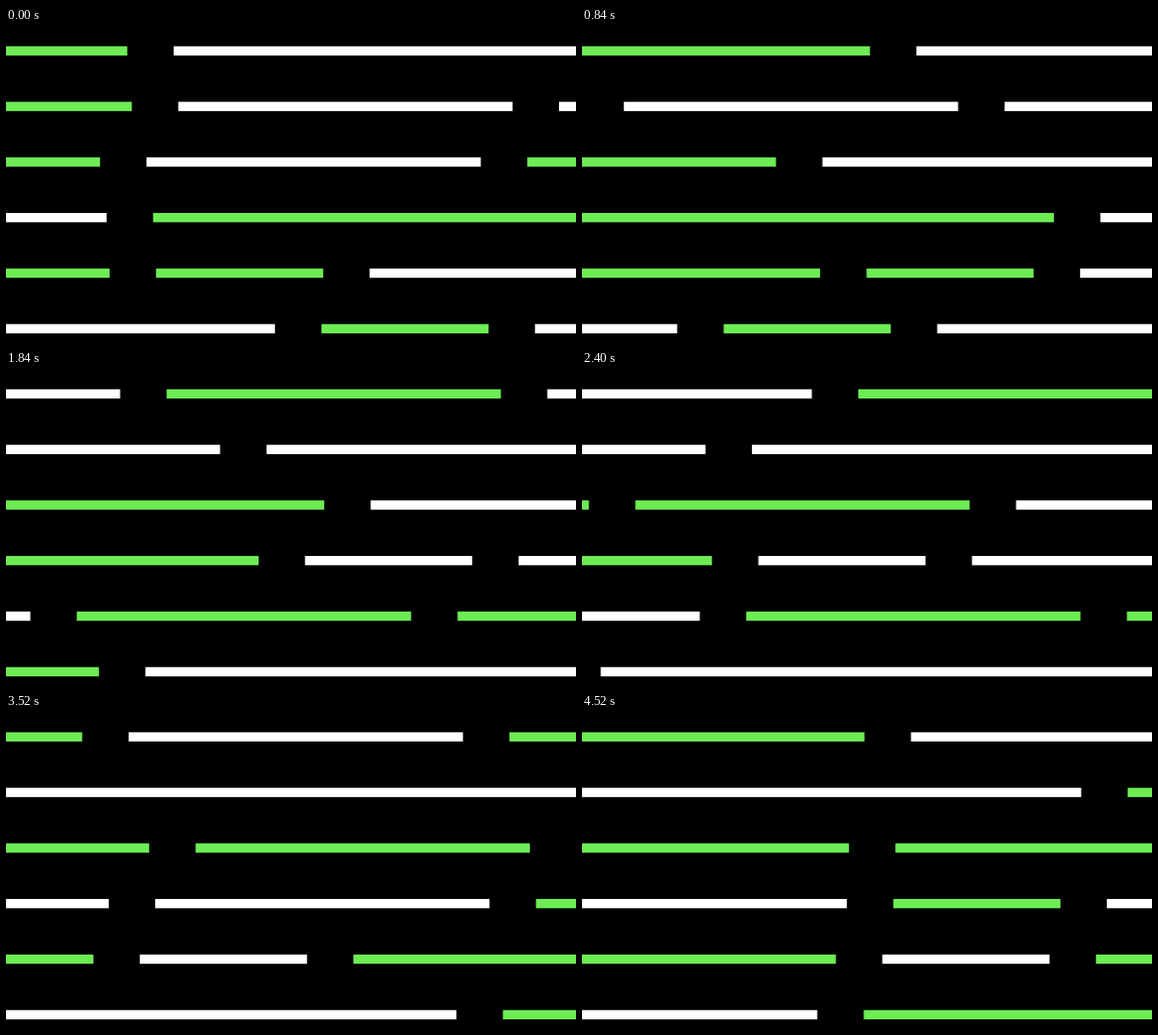
Write an HTML page that moves like this. It is 704 px wide and 390 px high and loops after 4560 ms.

```html
<!DOCTYPE html>
<html lang="en">
<head>
<meta charset="utf-8">
<title>Sliding bars</title>
<style>
html, body { margin: 0; width: 100%; height: 100%; overflow: hidden; background: #000; }
svg { display: block; width: 704px; height: 390px; }
.G { fill: #6dec54; }
.W { fill: #fff; }
/* --v is the signed speed of a row relative to the first one */
.row { animation: slide 4560ms -2ms infinite; }
@keyframes slide {
  0%       { transform: translateX(0px); animation-timing-function: steps(11); }
  9.6491%  { transform: translateX(calc(var(--v) * 103.4px)); animation-timing-function: steps(21); }
  28.0702% { transform: translateX(calc(var(--v) * 318.5px)); animation-timing-function: steps(28); }
  52.6316% { transform: translateX(calc(var(--v) * 604.3px)); animation-timing-function: steps(16); }
  66.6667% { transform: translateX(calc(var(--v) * 764.4px)); animation-timing-function: steps(24); }
  87.7193% { transform: translateX(calc(var(--v) * 1005.2px)); animation-timing-function: steps(12); }
  98.2456% { transform: translateX(calc(var(--v) * 1126px)); animation-timing-function: steps(1); }
  99.1228% { transform: translateX(calc(var(--v) * 1139.6px)); animation-timing-function: steps(1); }
  100%     { transform: translateX(calc(var(--v) * 1139.6px)); }
}
</style>
</head>
<body>
<svg id="stage" viewBox="0 0 704 390"></svg>
<script>
const UNIT = 206.45, GAP = 57.35, HEIGHT = 11.47, TOP = 22.6, PITCH = 68.8;

// speed, left edge of the first bar, bars as colour + length in units
const rows = [
  [1, -1203.6, "G2 W2 G2 W3"],
  [-0.783, -257.5, "G2 W2 W4 G2"],
  [0.6, -767, "G2 G2 W2 G2"],
  [-1.06, -288.6, "W2 G3 W1 W2 G1 W2"],
  [0.807, -1019, "G2 W1 G2 G1 W2"],
  [-1.043, -80.7, "W2 G1 W4 G2"]
];

function drawRow([speed, left, bars], i) {
  let x = left;
  const rects = bars.split(" ").map(([color, length]) => {
    const width = length * UNIT;
    const rect = `<rect class="${color}" x="${x}" y="${TOP + i * PITCH}" width="${width}" height="${HEIGHT}"/>`;
    x += width + GAP;
    return rect;
  });
  return `<g class="row" style="--v:${speed}">${rects.join("")}</g>`;
}

document.getElementById("stage").innerHTML = rows.map(drawRow).join("");
</script>
</body>
</html>
```
